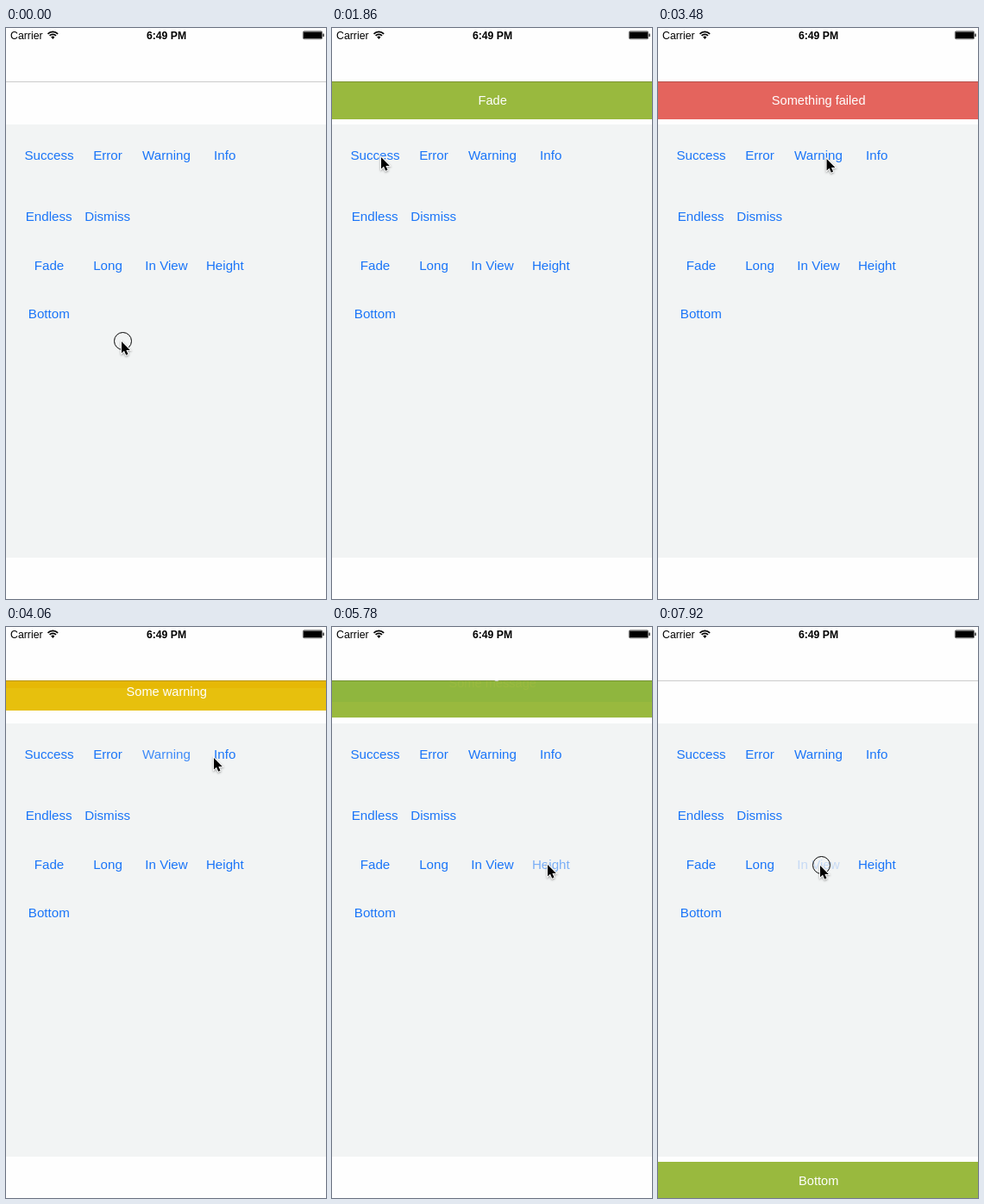
Write an HTML page with a canvas that moves like this. It is 371 by 663 pixels and loops after 8 s.

```html
<!DOCTYPE html>
<html lang="en">
<head>
<meta charset="utf-8">
<title>Message banners</title>
<style>
  html, body { margin: 0; width: 100%; height: 100%; overflow: hidden; background: #fefefe; }
  canvas { display: block; width: 371px; height: 663px; }
</style>
</head>
<body>
<canvas id="stage"></canvas>
<script>
const W = 371, H = 663, LOOP = 8000, SLIDE = 300, NAV = 62;
const FONT = '"Liberation Sans", Arial, sans-serif';
const canvas = document.getElementById('stage');
const ctx = canvas.getContext('2d');
const dpr = window.devicePixelRatio || 1;
canvas.width = W * dpr;
canvas.height = H * dpr;

const GREEN = 'rgba(148,182,52,.95)';
const RED = 'rgba(219,36,27,.7)';
const YELLOW = 'rgba(230,189,1,.95)';
const BLUE = 'rgba(44,187,255,.9)';

// label, centre x, baseline, press time, release time
const buttons = [
  ['Success', 50, 153, 2090, 2190],
  ['Error', 118, 153, 2870, 2955],
  ['Warning', 186, 153, 3770, 3855],
  ['Info', 253.7, 153, 4630, 4720],
  ['Endless', 49.7, 224],
  ['Dismiss', 117.7, 224],
  ['Fade', 50, 281, 980, 1070],
  ['Long', 118, 281],
  ['In View', 186, 281, 7870, 9000],
  ['Height', 253.8, 281, 5540, 5643],
  ['Bottom', 49.8, 337, 6740, 6840]
];

const banners = [
  { text: 'Fade', color: GREEN, from: 1070, to: 2190, mode: 'fade' },
  { text: 'Something success', color: GREEN, from: 2190, to: 2955 },
  { text: 'Something failed', color: RED, from: 2955, to: 3855 },
  { text: 'Some warning', color: YELLOW, from: 3855, to: 4720 },
  { text: 'Some message', color: BLUE, from: 4720, to: 5643 },
  { text: 'Height', color: GREEN, from: 5643, to: 6840, height: 100 },
  { text: 'Bottom', color: GREEN, from: 6840, to: 9000, mode: 'bottom' }
];

// time, x, y of the pointer tip
const path = [
  [0, 134, 364], [570, 134, 364], [950, 49, 273], [1420, 49, 273],
  [1820, 57, 150], [2610, 57, 150], [2850, 127, 149.5], [3060, 127, 149.5],
  [3420, 195, 152], [3530, 196, 152], [3880, 196, 152], [4055, 241, 152],
  [4900, 241, 152], [5370, 250, 276], [5900, 250, 276], [6330, 47, 335],
  [6440, 46.5, 331], [6950, 46.5, 331], [7450, 188, 277], [8000, 188, 277]
];

const clamp = v => Math.max(0, Math.min(1, v));

// cubic-bezier(.42, 0, .58, 1)
function ease(x) {
  x = clamp(x);
  let lo = 0, hi = 1, s = x;
  for (let i = 0; i < 18; i++) {
    s = (lo + hi) / 2;
    const bx = 1.26 * s * (1 - s) ** 2 + 1.74 * s * s * (1 - s) + s ** 3;
    if (bx < x) lo = s; else hi = s;
  }
  return s * s * (3 - 2 * s);
}

function text(str, x, y, size, color, align = 'center', weight = 'normal') {
  ctx.font = `${weight} ${size}px ${FONT}`;
  ctx.textAlign = align;
  ctx.fillStyle = color;
  ctx.fillText(str, x, y);
}

function rect(x, y, w, h, color) {
  ctx.fillStyle = color;
  ctx.fillRect(x, y, w, h);
}

function drawStatus() {
  text('Carrier', 5, 13, 12.3, '#000', 'left');
  text('6:49 PM', 186, 13, 12.2, '#000', 'center', 'bold');
  ctx.strokeStyle = '#000';
  ctx.lineWidth = 1.8;
  for (const r of [8.2, 5.2]) {
    ctx.beginPath();
    ctx.arc(54.3, 12.6, r, -Math.PI * 0.75, -Math.PI * 0.25);
    ctx.stroke();
  }
  ctx.fillStyle = '#000';
  ctx.beginPath();
  ctx.moveTo(54.3, 13);
  ctx.arc(54.3, 12.6, 3, -Math.PI * 0.75, -Math.PI * 0.25);
  ctx.fill();
  ctx.lineWidth = 0.6;
  ctx.beginPath();
  ctx.roundRect(344.3, 3.8, 22.4, 9, 1.6);
  ctx.stroke();
  rect(345, 4.5, 21, 7.6, '#000');
  rect(367.4, 6.6, 1.2, 3.4, '#000');
}

function drawButtons(t) {
  for (const [label, x, y, press, release] of buttons) {
    const alpha = t < press ? 1 : 0.2 + 0.8 * ease((t - release) / SLIDE);
    ctx.globalAlpha = press === undefined ? 1 : alpha;
    text(label, x, y, 15.15, '#1a75f8');
  }
  ctx.globalAlpha = 1;
}

function drawBanner(b, t) {
  if (t < b.from || t > b.to + SLIDE) return;
  const shown = ease((t - b.from) / SLIDE) - ease((t - b.to) / SLIDE);
  const h = b.height || 44;
  let y = NAV - h * (1 - shown);
  if (b.mode === 'fade') {
    y = NAV;
    ctx.globalAlpha = shown;
  } else if (b.mode === 'bottom') {
    y = 665 - h * shown;
  }
  rect(0, y, W, h, b.color);
  text(b.text, 186.2, y + h / 2 + 5.3, 14.6, '#fff');
  ctx.globalAlpha = 1;
}

function pointerAt(t) {
  const i = Math.max(1, path.findIndex(p => p[0] > t));
  const [t0, x0, y0] = path[i - 1], [t1, x1, y1] = path[i];
  const k = ease((t - t0) / (t1 - t0));
  return [x0 + (x1 - x0) * k, y0 + (y1 - y0) * k];
}

function drawPointer(t) {
  const [x, y] = pointerAt(t);
  const down = t < 50 || buttons.some(b => t >= b[3] && t < b[4]);
  if (down) {
    ctx.strokeStyle = '#000';
    ctx.lineWidth = 1;
    ctx.beginPath();
    ctx.arc(x + 1.5, y - 0.5, 10, 0, Math.PI * 2);
    ctx.stroke();
  }
  ctx.save();
  ctx.translate(x, y);
  ctx.beginPath();
  ctx.moveTo(0, 0);
  for (const [px, py] of [[0, 13.6], [3, 10.8], [5.2, 15.8], [7.5, 14.8], [5.4, 9.9], [9.8, 9.9]]) {
    ctx.lineTo(px, py);
  }
  ctx.closePath();
  ctx.shadowColor = 'rgba(0,0,0,.4)';
  ctx.shadowBlur = 2.5 * dpr;
  ctx.shadowOffsetY = dpr;
  ctx.strokeStyle = '#fff';
  ctx.lineWidth = 1.8;
  ctx.stroke();
  ctx.shadowColor = 'transparent';
  ctx.fillStyle = '#000';
  ctx.fill();
  ctx.restore();
}

function draw(t) {
  ctx.setTransform(dpr, 0, 0, dpr, 0, 0);
  rect(0, 0, W, H, '#fefefe');
  rect(0, 112, W, 503, '#f2f4f4');
  drawStatus();
  drawButtons(t);
  ctx.save();
  ctx.beginPath();
  ctx.rect(0, NAV, W, H - NAV);
  ctx.clip();
  banners.forEach(b => drawBanner(b, t));
  ctx.restore();
  rect(0, NAV, W, 1, 'rgba(0,0,0,.2)');
  drawPointer(t);
}

const start = performance.now();
function tick() {
  draw((performance.now() - start) % LOOP);
  requestAnimationFrame(tick);
}
tick();
</script>
</body>
</html>
```
